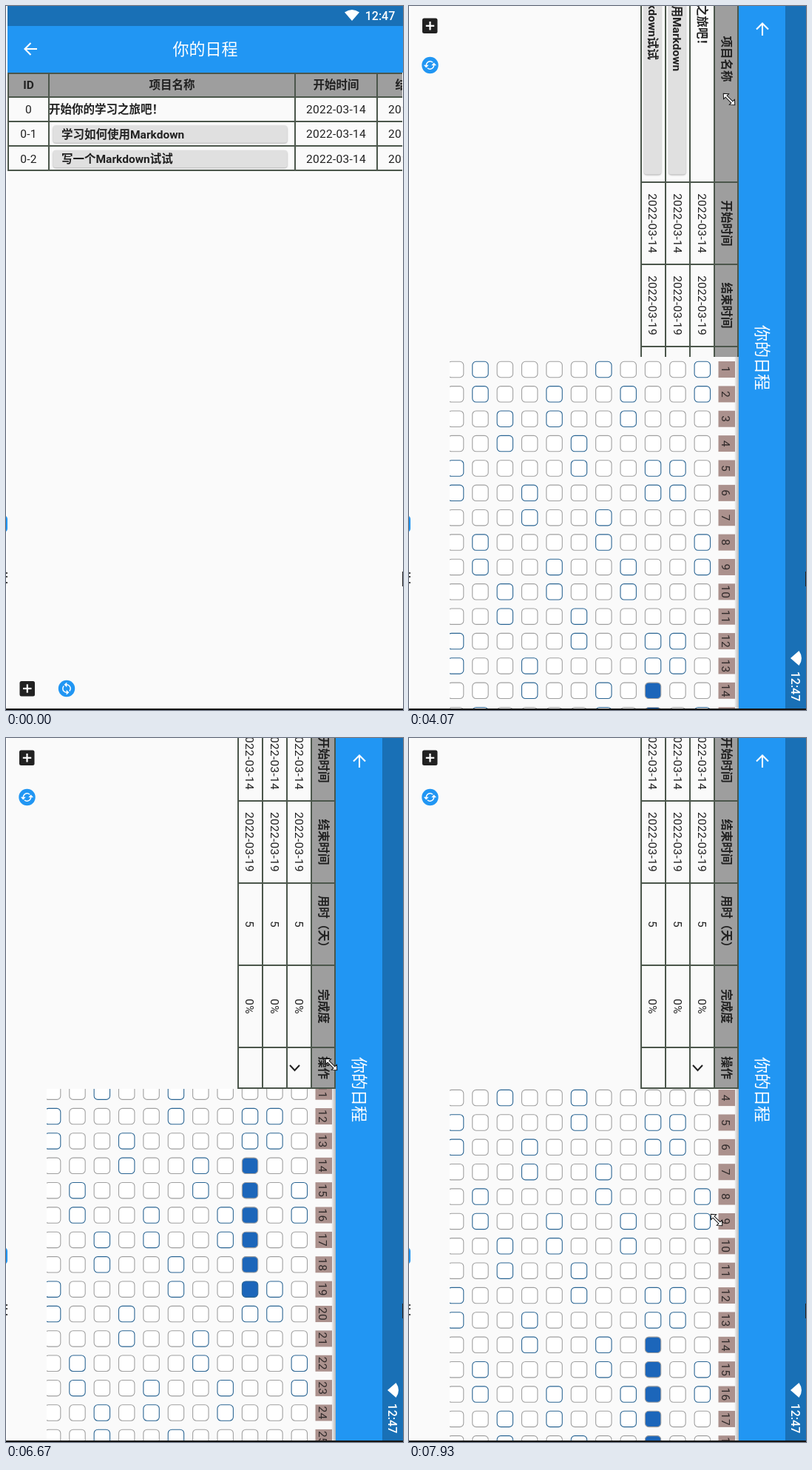
Animation of 537x951 px, one loop 7990 ms. Source, as an HTML page with a canvas:

```html
<!DOCTYPE html>
<html lang="zh-CN">
<head>
<meta charset="utf-8">
<style>
html, body { margin: 0; width: 100%; height: 100%; overflow: hidden; background: #fafafa; }
canvas { display: block; }
</style>
</head>
<body>
<canvas id="stage" width="537" height="951"></canvas>
<script>
const ctx = document.getElementById('stage').getContext('2d');
const LOOP = 7990, STEP = 1000 / 15;
const STAGE_W = 537, STAGE_H = 951;
const FONT = 'Roboto, "Noto Sans CJK SC", "Noto Sans CJK", sans-serif';
const BLUE = '#2196f3', PAPER = '#fafafa', INK = '#212121', LINE = '#4b564b';

const TABLE_VIEW = 474, TABLE_END = 888, TABLE_OVERFLOW = 415;
const GRID_BOTTOM = 482, PITCH = 33.37, DAY_WIDTH = 111;
const HEADS = ['ID', '项目名称', '开始时间', '结束时间', '用时（天）', '完成度', '操作'];
const TASKS = [
  ['0', '开始你的学习之旅吧！'],
  ['0-1', '学习如何使用Markdown'],
  ['0-2', '写一个Markdown试试'],
];

// Key points: time in steps, then values
const CURSOR = [
  [5, 366, 409], [16, 112, 872], [26, 83, 922], [38, 83, 922], [49, 366, 373], [53, 428, 323],
  [55, 428, 323], [61, 433, 126], [66, 436, 50], [79, 395, 747], [85, 347, 819], [94, 432, 806],
  [100, 440, 441], [106, 446, 305], [109, 450, 117], [119, 416, 651],
];
const GRID_SCROLL = [[94, 0], [100, 347], [106, 478], [108, 559], [111, 559], [119, 105]];

const ease = p => {
  const c = Math.min(1, Math.max(0, p));
  return c * c * (3 - 2 * c);
};
const tableScroll = step => TABLE_OVERFLOW * ease((step - 55) / 14.7);

function track(keys, step) {
  const next = keys.findIndex(k => k[0] >= step);
  if (next === 0) return keys[0].slice(1);
  const a = keys[next - 1], b = keys[next];
  const p = (step - a[0]) / (b[0] - a[0]);
  return a.slice(1).map((v, i) => v + (b[i + 1] - v) * p);
}

function columnX(i) {
  if (i < 2) return i ? 56 : 1;
  return Math.min(389 + (i - 2) * DAY_WIDTH, TABLE_END);
}

function box(x, y, w, h, fill) {
  ctx.fillStyle = fill;
  ctx.fillRect(x, y, w, h);
}

function rounded(x, y, w, h, r, fill, stroke) {
  ctx.beginPath();
  ctx.roundRect(x, y, w, h, r);
  ctx.fillStyle = fill;
  ctx.fill();
  if (stroke) {
    ctx.strokeStyle = stroke;
    ctx.stroke();
  }
}

function path(points, color, width) {
  ctx.beginPath();
  points.forEach(([x, y]) => ctx.lineTo(x, y));
  ctx.strokeStyle = color;
  ctx.lineWidth = width;
  ctx.stroke();
}

function label(str, x, y, size, { weight = 400, color = INK, align = 'center', gap = 0 } = {}) {
  ctx.font = `${weight} ${size}px ${FONT}`;
  ctx.letterSpacing = gap + 'px';
  ctx.textAlign = align;
  ctx.textBaseline = 'alphabetic';
  ctx.fillStyle = color;
  ctx.fillText(str, x, y + size * 0.36);
}

function clipped(x, y, w, h, draw) {
  ctx.save();
  ctx.beginPath();
  ctx.rect(x, y, w, h);
  ctx.clip();
  draw();
  ctx.restore();
}

function drawBars(w) {
  box(0, 0, w, 28, '#1970b6');
  box(0, 28, w, 63, BLUE);
  label('你的日程', w / 2, 59.5, 22, { color: '#fff' });
  label('12:47', w - 31, 14.5, 16, { weight: 500, color: '#fff' });
  ctx.beginPath();
  ctx.moveTo(w - 69, 21);
  ctx.lineTo(w - 79, 9.5);
  ctx.quadraticCurveTo(w - 69, 2.5, w - 59, 9.5);
  ctx.fillStyle = '#fff';
  ctx.fill();
  path([[40, 59], [24, 59]], '#fff', 2.1);
  path([[31.5, 51], [23.5, 59], [31.5, 67]], '#fff', 2.1);
}

function drawTable(view, scroll) {
  clipped(0, 91, view, 133, () => {
    ctx.translate(-scroll, 0);
    box(0, 91, TABLE_END, 33, '#9e9e9e');
    const mid = i => (columnX(i) + columnX(i + 1)) / 2;
    HEADS.forEach((head, i) => label(head, mid(i), 107.8, 15.5, { weight: 700 }));
    TASKS.forEach(([id, name], r) => {
      const y = 140.5 + r * PITCH;
      if (r) {
        ctx.save();
        ctx.shadowColor = 'rgba(0,0,0,.3)';
        ctx.shadowBlur = 2;
        ctx.shadowOffsetY = 1;
        rounded(61.5, y - 11.5, 317, 23.5, 4, '#e0e0e0');
        ctx.restore();
      }
      label(name, r ? 73 : 56, y + 0.3, 15.5, { weight: 700, align: 'left' });
      const cells = { 0: id, 2: '2022-03-14', 3: '2022-03-19', 4: '5', 5: '0%' };
      for (const col in cells) label(cells[col], mid(+col), y, 15.5, { gap: 0.25 });
    });
    path([[857, 140], [864, 146.5], [857, 153]], INK, 2);
    for (let i = 0; i < 5; i++) {
      const y = i ? 91 + 33 * i : 92;
      path([[0, y], [TABLE_END + 1, y]], LINE, 2);
    }
    for (let i = 0; i <= HEADS.length; i++) {
      path([[columnX(i), 91], [columnX(i), 224]], LINE, 2);
    }
  });
}

function drawIcons(y) {
  rounded(16.5, y - 10, 20.5, 20.5, 2.5, INK);
  path([[21, y], [32.5, y]], '#fff', 2.2);
  path([[26.8, y - 5.7], [26.8, y + 5.7]], '#fff', 2.2);
  ctx.beginPath();
  ctx.arc(80, y, 11.2, 0, 7);
  ctx.fillStyle = BLUE;
  ctx.fill();
  for (const turn of [0, Math.PI]) {
    ctx.save();
    ctx.translate(80, y);
    ctx.rotate(turn);
    ctx.beginPath();
    ctx.arc(0, 0, 5.2, -1.6, 0.75);
    ctx.strokeStyle = '#fff';
    ctx.lineWidth = 1.5;
    ctx.stroke();
    ctx.beginPath();
    ctx.moveTo(-3.4, -5.2);
    ctx.lineTo(0.3, -8.6);
    ctx.lineTo(0.3, -1.8);
    ctx.fillStyle = '#fff';
    ctx.fill();
    ctx.restore();
  }
}

function drawDay(month, day, x, y) {
  const date = new Date(2022, month, day);
  const exists = date.getMonth() === month;
  const weekend = exists && date.getDay() % 6 === 0;
  const planned = month === 2 && day >= 14 && day <= 19;
  const fill = planned ? '#1c66ba' : exists ? '#fff' : '#f9e84e';
  ctx.lineWidth = 1.1;
  rounded(x - 10.7, y - 10.7, 21.4, 21.4, 5, fill, weekend ? '#2b6593' : '#a0a0a0');
}

function drawCalendar(scroll) {
  clipped(TABLE_VIEW, 91, STAGE_H - TABLE_VIEW, GRID_BOTTOM - 91, () => {
    for (let day = 1; day <= 31; day++) {
      const x = 491 + (day - 1) * PITCH - scroll;
      box(x - 11, 96, 22, 22.5, '#ab918d');
      label(day, x, 108, 15.5, { color: '#302a2a', gap: 0.25 });
      for (let month = 0; month < 11; month++) drawDay(month, day, x, 140.2 + month * PITCH);
    }
  });
  const shade = ctx.createLinearGradient(0, 91, 0, 97);
  shade.addColorStop(0, 'rgba(0,0,0,.28)');
  shade.addColorStop(1, 'rgba(0,0,0,0)');
  box(TABLE_VIEW, 91, STAGE_H - TABLE_VIEW, 6, shade);
}

function portrait() {
  ctx.save();
  ctx.translate(2, -1);
  box(0, 0, 535, STAGE_H + 1, PAPER);
  drawBars(535);
  drawTable(534, 0);
  drawIcons(923);
  ctx.restore();
}

function landscape(step) {
  ctx.save();
  ctx.translate(STAGE_W, 0);
  ctx.rotate(Math.PI / 2);
  box(0, 0, STAGE_H, 535, PAPER);
  drawBars(950);
  drawCalendar(track(GRID_SCROLL, step)[0]);
  drawTable(TABLE_VIEW, tableScroll(step));
  drawIcons(508.5);
  ctx.restore();
}

function turned(angle, alpha, draw) {
  ctx.save();
  ctx.globalAlpha = alpha;
  ctx.translate(269, 475);
  ctx.rotate(angle);
  ctx.translate(-269, -475);
  draw();
  ctx.restore();
}

function drawScreen(step) {
  const p = ease((step - 28) / 7);
  if (p === 0) return portrait();
  if (p === 1) return landscape(step);
  box(0, 0, STAGE_W, STAGE_H, '#000');
  turned((p - 1) * Math.PI / 2, 1, () => landscape(step));
  turned(p * Math.PI / 2, 1 - p, portrait);
}

function drawEdges() {
  box(0, 0, 2, STAGE_H, '#fff');
  box(0, 949, STAGE_W, 2, '#151515');
  rounded(-8, 688, 10, 23, 5, BLUE);
  [765, 770, 778].forEach(y => box(0, y, 2, 2, '#444'));
  box(536, 764, 1, 20, '#222');
}

function drawCursor(step) {
  if (step < CURSOR[0][0]) return;
  const [x, y] = track(CURSOR, step);
  ctx.save();
  ctx.translate(x, y);
  ctx.rotate(Math.PI / 4);
  ctx.beginPath();
  for (const s of [1, -1]) {
    [[-5.5, -1.4], [5.5, -1.4], [5.5, -5], [11, 0], [5.5, 5], [5.5, 1.4]]
      .forEach(([px, py]) => ctx.lineTo(px * s, py * s));
  }
  ctx.closePath();
  ctx.fillStyle = '#fff';
  ctx.fill();
  ctx.strokeStyle = '#111';
  ctx.lineWidth = 1;
  ctx.stroke();
  ctx.restore();
}

function frame(now) {
  const step = Math.floor((now % LOOP) / STEP + 0.1);
  box(0, 0, STAGE_W, STAGE_H, PAPER);
  drawScreen(step);
  drawEdges();
  drawCursor(step);
  requestAnimationFrame(frame);
}
requestAnimationFrame(frame);
</script>
</body>
</html>
```
